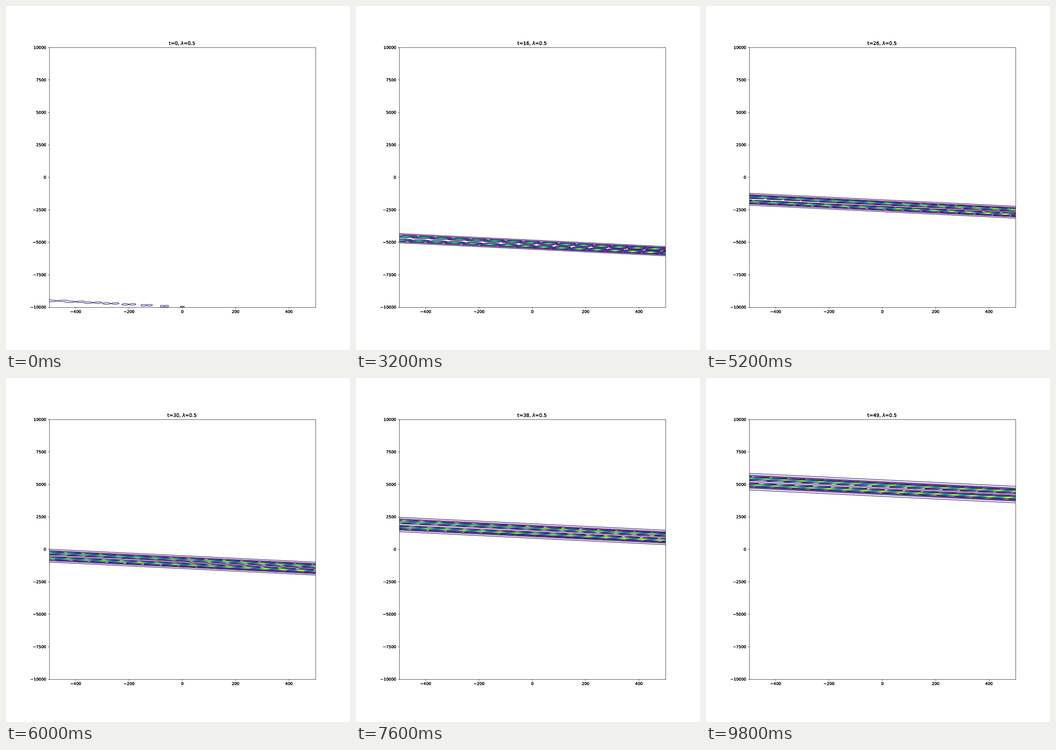
Write a matplotlib script that moves like this. It is 748x748 px and loops after 10000 ms.

```python
import numpy as np
import matplotlib.pyplot as plt
from matplotlib.animation import FuncAnimation
from matplotlib.patheffects import Normal

SIZE = 748
FRAMES = 50
STEP_MS = 200
DT = 100             # time that passes in one step
LAM = 0.5

plt.rcParams["font.family"] = "DejaVu Sans"

fig = plt.figure(figsize=(12, 12), dpi=SIZE / 12, facecolor="white")
ax = fig.add_subplot()
fig.subplots_adjust(left=0.125, right=0.9, bottom=0.125, top=0.88)
ax.set_xlim(-500, 500)
ax.set_ylim(-10000, 10000)
title = ax.set_title("")

# Layered drawing gives the text its heavy, crisp edges.
for text in [title, *ax.get_xticklabels(), *ax.get_yticklabels()]:
    text.set_path_effects([Normal()] * 3)

# The y grid is coarse on purpose: the sloped ridges break into beads on it.
X, Y = np.meshgrid(np.linspace(-500, 500, 301), np.linspace(-10000, 10000, 300))


def wave(t):
    """Rational line wave 2 (ln F)'' with F = |u^2 - r + i s|^2 + u^2 + 1."""
    time = DT * t
    h = Y + 10000
    u = X + 2 * LAM * h - 12 * LAM ** 2 * time
    r = 24 * LAM * time
    s = 2 * h
    p = u ** 2 - r
    f = p ** 2 + s ** 2 + u ** 2 + 1
    f1 = 4 * u * p + 2 * u
    f2 = 4 * p + 8 * u ** 2 + 2
    return 2 * (f2 / f - (f1 / f) ** 2)


def draw(t):
    for old in list(ax.collections):
        old.remove()
    ax.contour(X, Y, wave(t), 50, cmap="viridis", linewidths=1.5)
    title.set_text(rf"t={t}, $\lambda$={LAM}")
    return []


anim = FuncAnimation(fig, draw, frames=FRAMES, init_func=lambda: draw(0),
                     interval=STEP_MS, repeat=True, repeat_delay=0)
plt.show()
```
